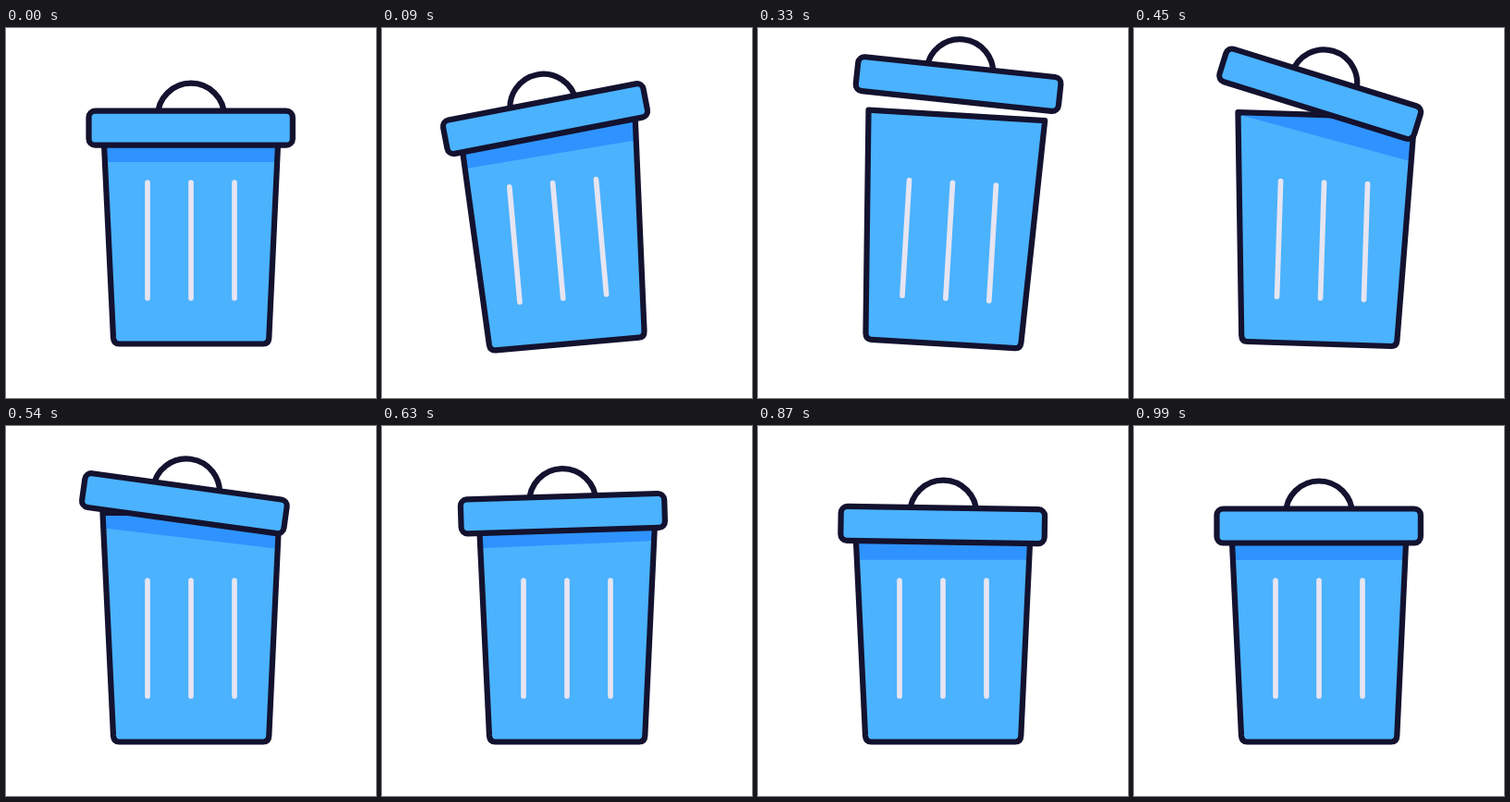
Recreate the animation shown at these times as an HTML page. Size 400x400 px, loop 3.02 s.

```html
<!DOCTYPE html>
<html lang="en">
<head>
<meta charset="utf-8">
<title>Trash can</title>
<style>
  html, body { margin: 0; height: 100%; overflow: hidden; background: #fff; }
  svg { display: block; width: 100%; height: 100%; }
  .line { stroke: #13122f; stroke-width: 6.2; stroke-linejoin: round; }
</style>
</head>
<body>
<svg viewBox="0 0 400 400">
  <defs>
    <path id="shape" d="M104.5 94H295.5L284.3 335Q284 341.5 278 341.5H122.5Q116.5 341.5 116 335Z"/>
    <clipPath id="inside"><use href="#shape"/></clipPath>
  </defs>
  <g id="can">
    <use href="#shape" fill="#4bb2fe"/>
    <g clip-path="url(#inside)">
      <rect id="shade" x="0" y="-60" width="400" height="205" fill="#2e93ff"/>
    </g>
    <use href="#shape" class="line" fill="none"/>
    <path d="M153 167V292M200 167V292M247 167V292" stroke="#e6e5f1" stroke-width="5.7" stroke-linecap="round"/>
    <g id="lid" class="line">
      <circle cx="200" cy="95.7" r="36" fill="none" clip-path="inset(-4px -4px 36px -4px)"/>
      <rect x="89.5" y="89.7" width="220.4" height="37" rx="7" fill="#4bb2fe"/>
    </g>
  </g>
</svg>
<script>
const LOOP = 3020, STEP = 30, END = 990;
const PEAK = 290, HEIGHT = 49, FALL = 300;

const ease = u => u * u * (3 - 2 * u);

// Eases from one [time, value] pose to the next and holds the last.
const sway = (...poses) => t => {
  const i = poses.findIndex(([time]) => time > t);
  if (i < 0) return poses[poses.length - 1][1];
  const [t0, v0] = poses[i - 1], [t1, v1] = poses[i];
  return v0 + (v1 - v0) * ease((t - t0) / (t1 - t0));
};

const canTurn = sway([0, 0], [180, -10.2], [350, 4], [540, 0]);
const lidTurn = sway([0, 0], [190, -12.7], [455, 15.5], [640, -1.9], [750, 1.8], [990, 0]);
const lidDrift = sway([0, 0], [210, -4], [330, 0], [470, -7.6], [820, 0]);
const shadeTurn = sway([0, 0], [190, -9.4], [455, 13.4], [650, -3], [820, 0]);
const shadeRise = sway([0, 0], [360, -58], [450, -26], [900, 0]);

// The lid is thrown up, then settles softly.
const lidRise = t => -HEIGHT * (t < PEAK ? ease(t / PEAK) : Math.exp(-(((t - PEAK) / FALL) ** 2)));

function pose(id, x, y, turn, cx, cy) {
  document.getElementById(id).setAttribute("transform", `translate(${x} ${y}) rotate(${turn} ${cx} ${cy})`);
}

function draw() {
  const now = performance.now() % LOOP;
  const t = Math.min(END, Math.floor(now / STEP) * STEP);
  pose("can", 0, 0, canTurn(t), 200, 340);
  pose("lid", lidDrift(t), lidRise(t), lidTurn(t), 199.7, 108.2);
  pose("shade", 0, shadeRise(t), shadeTurn(t), 200, 145);
  requestAnimationFrame(draw);
}
draw();
</script>
</body>
</html>
```
